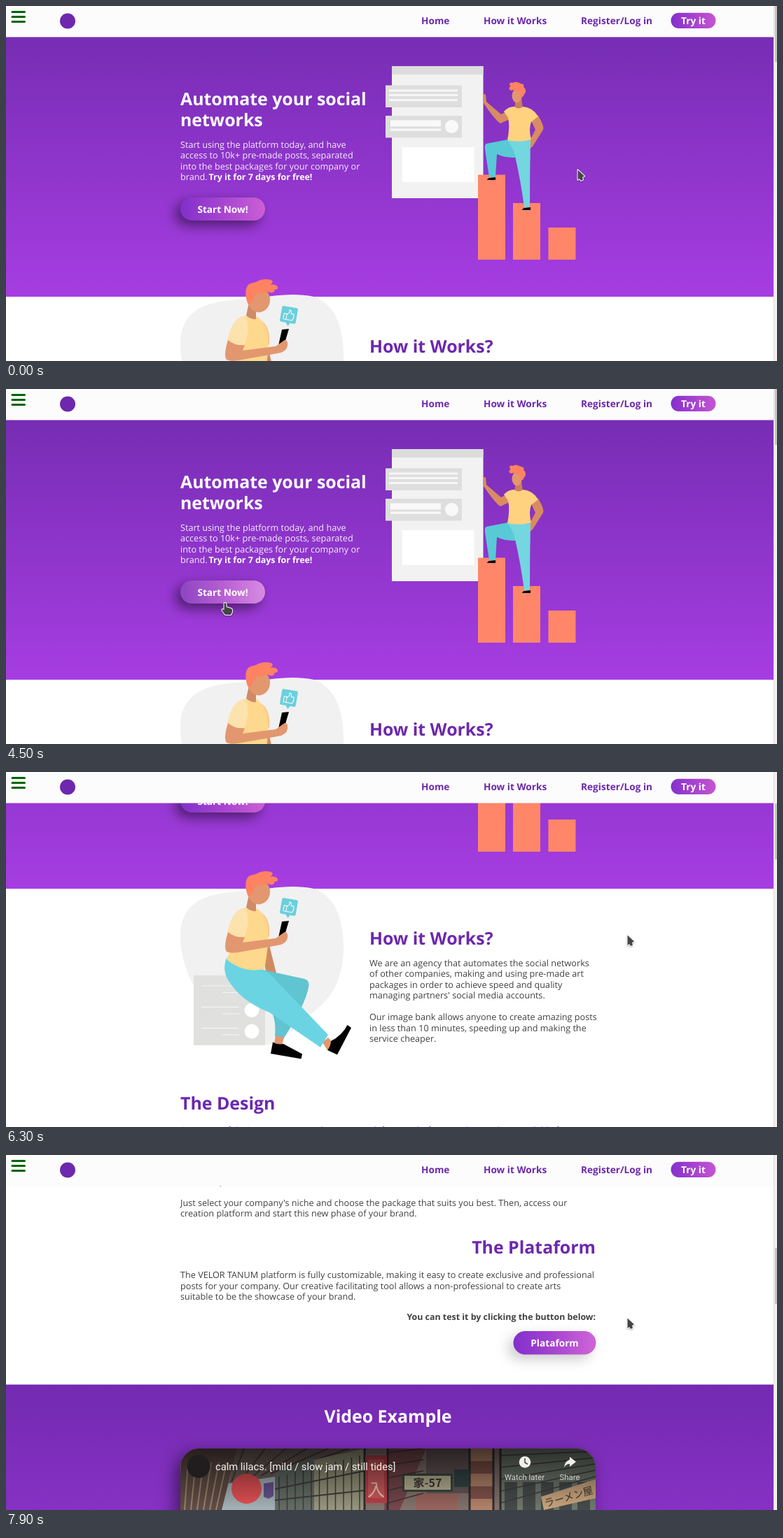
An HTML page with a canvas for the animation above (8000 ms loop, 1101x508 px).

```html
<!DOCTYPE html>
<html lang="en">
<head>
<meta charset="utf-8">
<title>Social automation landing page</title>
<style>
html, body { margin: 0; width: 100%; height: 100%; overflow: hidden; background: #fff; }
canvas { display: block; }
</style>
</head>
<body>
<canvas id="stage" width="1101" height="508"></canvas>
<script>
const ctx = document.getElementById('stage').getContext('2d');
const LOOP = 8000, W = 1096, H = 508, HEAD = 44.5, LINE = 15.45, VIDEO_TOP = 1068.5;
const PURPLE = '#6d28ad', TEXT = '#404040', SKIN = '#e2976f', HAIR = '#ff8262', CORAL = '#ff8669';
const SANS = '"Open Sans", "Noto Sans", sans-serif', ROBOTO = 'Roboto, sans-serif', CJK = '"Noto Sans CJK JP", "Noto Sans CJK", sans-serif';
const BODY = `12.65px ${SANS}`, STRONG = `700 12.4px ${SANS}`;
const NAV = `700 13.65px ${SANS}`, TITLE = `700 24.9px ${SANS}`;

// time, x, y of the pointer; it moves in 100 ms steps
const POINTER = [
  [0, 816, 234], [100, 783, 227], [300, 783, 227], [600, 660, 180], [900, 502, 122],
  [1200, 553, 79], [1500, 618, 48], [1800, 683, 22], [1900, 689, 18], [2000, 692, 12],
  [2100, 694, 16], [2200, 712, 26], [2500, 835, 24], [2600, 848, 20], [4400, 848, 20],
  [4500, 313, 306], [4900, 313, 306], [5000, 850, 243], [5100, 850, 243],
  [5200, 880, 234], [5300, 880, 234], [5400, 887, 233], [8000, 887, 233]
];
// time, scroll offset
const SCROLL = [[0, 0], [5600, 26], [5800, 185], [6300, 249], [6500, 370], [7100, 555], [7600, 620], [7900, 740]];

function rect(color, x, y, w, h) {
  ctx.fillStyle = color;
  ctx.fillRect(x, y, w, h);
}
function shape(color, d) {
  ctx.fillStyle = color;
  ctx.fill(new Path2D(d));
}
function line(color, width, d) {
  ctx.strokeStyle = color;
  ctx.lineWidth = width;
  ctx.stroke(new Path2D(d));
}
function oval(color, x, y, rx, ry = rx, turn = 0) {
  ctx.fillStyle = color;
  ctx.beginPath();
  ctx.ellipse(x, y, rx, ry, turn, 0, 7);
  ctx.fill();
}
function round(color, x, y, w, h, r) {
  ctx.fillStyle = color;
  ctx.beginPath();
  ctx.roundRect(x, y, w, h, r);
  ctx.fill();
}
function text(str, x, y, font, color, align = 'left') {
  ctx.font = font;
  ctx.fillStyle = color;
  ctx.textAlign = align;
  ctx.fillText(str, x, y);
}
function para(lines, x, y, color) {
  lines.forEach((s, i) => text(s, x, y + i * LINE, BODY, color));
}
function fade(x0, y0, x1, y1, ...colors) {
  const g = ctx.createLinearGradient(x0, y0, x1, y1);
  colors.forEach((c, i) => g.addColorStop(i / (colors.length - 1), c));
  return g;
}
function raised(shadow, offset, blur, paint) {
  ctx.save();
  ctx.shadowColor = shadow;
  ctx.shadowOffsetX = -offset;
  ctx.shadowOffsetY = offset;
  ctx.shadowBlur = blur;
  paint();
  ctx.restore();
}
function pill(x, y, w, h, ...colors) {
  round(fade(x, 0, x + w, 0, ...colors), x, y, w, h, h / 2);
}

function climber() {
  rect('#f2f2f2', 551, 86, 130.5, 189);
  rect('#dcdcdc', 551, 86, 130.5, 12);
  rect('#dedede', 542, 113.5, 109, 31.5);
  for (const y of [119.5, 126, 133]) rect('#f7f7f7', 547, y, 98, 3);
  rect('#dedede', 542, 157, 109, 31.5);
  rect('#f9f9f9', 549, 163.5, 72, 9);
  rect('#f9f9f9', 549, 175.5, 72, 3.2);
  oval('#f9f9f9', 636.5, 172.5, 9.5);
  rect('#fff', 566, 202, 102.5, 50);

  rect(CORAL, 674, 241.5, 39, 121.5);
  rect(CORAL, 724, 282, 39, 81);
  rect(CORAL, 774.5, 317, 39, 46);

  shape('#d98b62', 'M681 125L685 127L686 137L707 155L715 151L721 161L706 168Q699 164 682 139Z');
  shape('#d98b62', 'M754 158L760 157Q769 172 767 177L752 201L746 206L744 200L756 177L750 164Z');
  shape('#59c9d6', 'M717 191L686 197Q683 199 684 205L690 245L699 245L701 212Q716 219 735 216L738 192Z');
  shape('#74d6df', 'M716 192L749 191Q748 240 748 288L740 288Q735 250 727 215Q724 202 716 192Z');
  shape('#c98058', 'M728 133L736 131L738 147Q732 151 726 147Z');
  shape('#ffd27f', 'M726 144Q732 149 738 144Q752 145 760 158L750 166Q746 176 750 191Q734 196 716 192Q720 172 717 160L711 151Q717 144 726 144Z');
  oval(SKIN, 729.5, 128.5, 7, 10);
  shape(HAIR, 'M722 121C717 120 718 115 721 115C717 112 720 108 724 110C728 107 733 110 735 111C740 111 740 115 739 116C743 118 743 125 740 126C739 131 735 132 734 128C736 124 733 121 730 123C728 120 725 119 722 121Z');
  shape('#000', 'M687 249Q688 246 691 246L699 245L699 249Z');
  shape('#000', 'M737 292Q738 289 741 289L749 288L749 292Z');
}

// drawn relative to its own block of the page
function sitter() {
  shape('#f1f1f1', 'M249 235C249 178 300 172 345 170C380 167 405 160 440 167C475 180 482 220 482 252C481 310 455 332 430 350C405 372 385 400 352 388C320 375 290 340 272 312C258 290 249 262 249 235Z');
  rect('#e0e0de', 268, 291, 102, 100);
  for (let i = 0; i < 3; i++) {
    const y = 306 + i * 30.3;
    oval('#fff', 351, y + 4.5, 10.3);
    line('#f4f4f4', 1.2, `M279 ${y}H332M309 ${y + 9.5}H333`);
  }
  shape('#d08a62', 'M366 248L374 240L386 288L371 286Z');
  shape('#60c4d1', 'M362 282L426 296Q434 298 432 308Q428 332 396 382L384 378Q388 340 360 318Z');
  shape(SKIN, 'M385 377L397 380L394 391L383 389ZM452 387L460 380L467 388L459 398Z');
  shape('#6ad4e2', 'M315 266Q308 284 318 299Q336 328 376 344L449 394L460 376L376 288L364 281Z');
  shape('#000', 'M381 386.5Q388 391 396 389L423 403.5L421.5 410.5L378 403ZM487.5 362L493 366L473 404.5L459 398Q464 392 464 385Q480 377 487.5 362Z');
  shape('#ffc58a', 'M362 200Q378 207 376 235L371 240Z');
  shape('#fed88c', 'M341 194Q352 200 358 195Q372 205 374 225Q376 245 369 282Q338 288 315 268Q324 250 326 236L330 205Z');
  shape('#fce2ac', 'M341 194Q322 198 316 230Q328 238 341 236Q350 208 341 194Z');
  shape('#000', 'M394 214L404 213L396 240L389 237Z');
  shape(SKIN, 'M317 229Q311 248 314 256Q318 260 332 258L388 248Q401 246 402 237Q403 229 398 229L385 238L338 244L341 236Q328 238 317 229Z');
  shape('#cf8a66', 'M347 175L357 185L357 199Q350 200 343 194Z');
  oval(SKIN, 361.5, 172, 15.5, 17.5, .15);
  shape(HAIR, 'M346 178C341 168 341 155 346 150C350 147 354 147 357 146C364 141 377 141 380 144C382 147 379 149 377 150C384 148 389 152 388 155C387 157 385 157 383 157C385 160 379 163 374 160C370 159 366 164 361 162C356 163 354 167 353 170C352 174 350 177 346 178Z');

  ctx.save();
  ctx.translate(404, 193);
  ctx.rotate(.17);
  round('#6ccfdd', -11.5, -11.5, 23, 23, 2.5);
  shape('#6ccfdd', 'M-3 11L4 11L1 16Z');
  line('#fff', 1, 'M-7 -1H-3V7H-7ZM-3 0L0 -3V-7Q3 -7 3 -2H7Q8 2 6 7H-3');
  ctx.restore();
}

function video() {
  ctx.save();
  ctx.beginPath();
  ctx.roundRect(249, 420, 593, 334, 27);
  ctx.clip();
  rect('#82706a', 249, 420, 593, 334);
  shape('#a3b0b5', 'M306 508L318 455L400 436L396 508Z');
  shape('#5f4c45', 'M249 420H330L308 508H249Z');
  for (let i = 0; i < 7; i++) line('#9a816c', 2, `M${249 + i * 11} 440L${246 + i * 9} 508`);
  shape('#6b5d57', 'M330 420H520L400 458L318 470Z');
  for (let i = 0; i < 6; i++) line('#3c3634', 1.5, `M${340 + i * 30} 420L${322 + i * 14} ${468 - i * 3}`);
  shape('#626b64', 'M384 455L440 432V508H384Z');
  shape('#96947c', 'M440 436L512 420V508H440Z');
  for (let i = 0; i < 11; i++) line('#3f3c3a', 1.5, `M${390 + i * 11.5} 508V${460 - i * 3}`);
  line('#3f3c3a', 2, 'M384 478L512 452M384 494L512 480');
  shape('#75464a', 'M545 420H600L562 508H540Z');
  rect('#96635b', 585, 484, 60, 24);
  rect('#655456', 600, 420, 62, 64);
  for (let i = 0; i < 5; i++) {
    rect(i % 2 ? '#7f5148' : '#b08067', 662, 420 + i * 18, 34, 18);
    line('#3c3634', 1.5, `M545 ${426 + i * 18}L596 ${420 + i * 16}`);
  }
  rect('#6d766c', 706, 420, 136, 88);
  for (let i = 0; i < 5; i++) {
    rect('#454a49', 712 + i * 26, 468, 18, 40);
    line('#3f3c3a', 1.5, `M706 ${430 + i * 17}L842 ${424 + i * 9}`);
  }
  line('#2f2c2c', 3, 'M662 420V508M696 420V508M706 420V508M512 420V508M545 420V508');
  rect('#b83f48', 513, 430, 31, 68);
  rect('#c8575a', 517, 436, 23, 55);
  text('入', 528.5, 488, `25px ${CJK}`, '#efc4b6', 'center');
  rect('#39463f', 566, 456, 72, 26);
  rect('#b5b090', 569, 459, 66, 20);
  text('家-57', 602, 475, `700 16px ${CJK}`, '#3a3433', 'center');
  rect('#334446', 640, 450, 22, 25);
  shape('#c5a27b', 'M764 489L842 464V491L768 508Z');
  ctx.save();
  ctx.translate(805, 494);
  ctx.rotate(-.28);
  text('ラーメン屋', 0, 0, `14.5px ${CJK}`, '#40332d', 'center');
  ctx.restore();
  oval('#e04f52', 343.5, 477.5, 21.5);
  shape('#65518c', 'M368 470L382 468V488L375 492L368 489Z');
  rect(fade(0, 420, 0, 505, 'rgba(0,0,0,.6)', 'rgba(0,0,0,0)'), 249, 420, 593, 88);

  oval('#1f1d1d', 275, 445.5, 16.5);
  text('calm lilacs. [mild / slow jam / still tides]', 299, 451, `14.7px ${ROBOTO}`, '#f2f0ee');
  oval('#f0efee', 741, 439.5, 8.3);
  line('#4b4845', 1.6, 'M741 434V440L745 442.5');
  shape('#f0efee', 'M805 432L814 439L805 446V442Q800 442 797 447Q798 438 805 436Z');
  text('Watch later', 740.5, 465, `11.3px ${ROBOTO}`, '#d5d2cf', 'center');
  text('Share', 805, 465, `11.3px ${ROBOTO}`, '#d5d2cf', 'center');
  ctx.restore();
}

function page(hot) {
  rect('#fff', 0, 0, W, VIDEO_TOP + 1);
  rect(fade(0, 45, 0, 416, '#772db4', '#a63de2'), 0, 0, W, 416);
  text('Automate your social', 249, 142, TITLE, '#fff');
  text('networks', 249, 172, TITLE, '#fff');
  para([
    'Start using the platform today, and have',
    'access to 10k+ pre-made posts, separated',
    'into the best packages for your company or',
    'brand.'
  ], 249, 203, '#f4edf9');
  text('Try it for 7 days for free!', 289.5, 203 + 3 * LINE, STRONG, '#fff');
  const warm = hot === 'start' ? ['#8d45c2', '#b65fd2', '#d98be3'] : ['#8130cb', '#a745d0', '#cb5fd6'];
  raised('rgba(0,0,0,.5)', 7, 18, () => pill(249, 274, 121, 33, ...warm));
  text('Start Now!', 309.5, 295.5, NAV, '#fff', 'center');
  climber();

  ctx.save();
  ctx.translate(0, 249);
  sitter();
  ctx.restore();
  text('How it Works?', 519, 496, TITLE, PURPLE);
  para([
    'We are an agency that automates the social networks',
    'of other companies, making and using pre-made art',
    'packages in order to achieve speed and quality',
    "managing partners' social media accounts.",
    '',
    'Our image bank allows anyone to create amazing posts',
    'in less than 10 minutes, speeding up and making the',
    'service cheaper.'
  ], 519, 527, TEXT);

  text('The Design', 249, 732, TITLE, PURPLE);
  para([
    'Our team of designers creates exclusive artwork for our platform, and we make it available for you',
    'to use as you wish.',
    '',
    "Just select your company's niche and choose the package that suits you best. Then, access our",
    'creation platform and start this new phase of your brand.'
  ], 249, 766.4, TEXT);

  text('The Plataform', 842, 881, TITLE, PURPLE, 'right');
  para([
    'The VELOR TANUM platform is fully customizable, making it easy to create exclusive and professional',
    'posts for your company. Our creative facilitating tool allows a non-professional to create arts',
    'suitable to be the showcase of your brand.'
  ], 249, 916.4, TEXT);
  text('You can test it by clicking the button below:', 842, 975.5, STRONG, TEXT, 'right');
  raised('rgba(0,0,0,.2)', 7, 18, () => pill(724.5, 992, 118, 33.5, '#8130cb', '#a745d0', '#d066d8'));
  text('Plataform', 783.5, 1014, NAV, '#fff', 'center');

  rect(fade(0, VIDEO_TOP, 0, 1560, '#732ab1', '#a63de2'), 0, VIDEO_TOP, W, 491);
  text('Video Example', 545.5, 1123, TITLE, '#fff', 'center');
  raised('rgba(0,0,0,.5)', 7, 24, () => round('#493f3d', 249, 1160, 593, 334, 27));
  ctx.save();
  ctx.translate(0, 740);
  video();
  ctx.restore();
}

function header(hot) {
  const link = (name, label, x) => text(label, x, 25.7, NAV, hot === name ? '#b568e6' : PURPLE);
  rect('#fcfcfc', 0, 0, W, HEAD);
  for (const y of [7, 14, 21]) pill(7.5, y, 20.5, 3, '#006400', '#006400');
  oval(PURPLE, 88, 21.5, 11);
  link('home', 'Home', 593);
  link('how', 'How it Works', 682);
  link('login', 'Register/Log in', 821);
  pill(949.5, 9.7, 64, 22.3, '#8630cc', '#c455d2');
  text('Try it', 981.5, 25.7, NAV, '#fff', 'center');
}

function scrollbar(y) {
  rect('#f1f0ef', W, 0, 5, H);
  rect('#dddbd9', W, 0, 1, H);
  rect('#c6c4c2', W + 2, Math.round(y * .18), 3, 80);
}

function pointer(x, y, hand) {
  ctx.save();
  ctx.translate(x, y);
  ctx.lineJoin = 'round';
  ctx.shadowColor = 'rgba(0,0,0,.3)';
  ctx.shadowBlur = 2;
  ctx.shadowOffsetY = 1;
  const d = hand
    ? 'M-1.5 1Q0 -1 1.5 1V6L8 8Q11 9 10 13L8 17H0L-4.5 11Q-5 8 -1.5 10Z'
    : 'M.5 .5L10 9.5L7 11L8 14.5L5 16L3 13L.5 15Z';
  line('#fff', 2, d);
  ctx.shadowColor = 'transparent';
  shape('#454545', d);
  ctx.restore();
}

function pointerAt(t) {
  const q = Math.floor(t / 100) * 100;
  const i = POINTER.findIndex(k => k[0] > q);
  const [t0, x0, y0] = POINTER[i - 1], [t1, x1, y1] = POINTER[i];
  const u = (q - t0) / (t1 - t0);
  return [x0 + (x1 - x0) * u, y0 + (y1 - y0) * u];
}

function hovered(t) {
  if (t >= 1800 && t < 2200) return 'how';
  if (t >= 2500 && t < 4500) return 'login';
  if (t >= 4500 && t < 5000) return 'start';
  return '';
}

function draw(t) {
  const hot = hovered(t);
  const scroll = SCROLL.filter(k => k[0] <= t).pop()[1];
  ctx.textRendering = 'geometricPrecision';
  ctx.save();
  ctx.translate(0, -scroll);
  page(hot);
  ctx.restore();
  header(hot);
  scrollbar(scroll);
  pointer(...pointerAt(t), hot !== '');
}

const start = performance.now();
function tick() {
  draw((performance.now() - start) % LOOP);
  requestAnimationFrame(tick);
}
tick();
</script>
</body>
</html>
```
